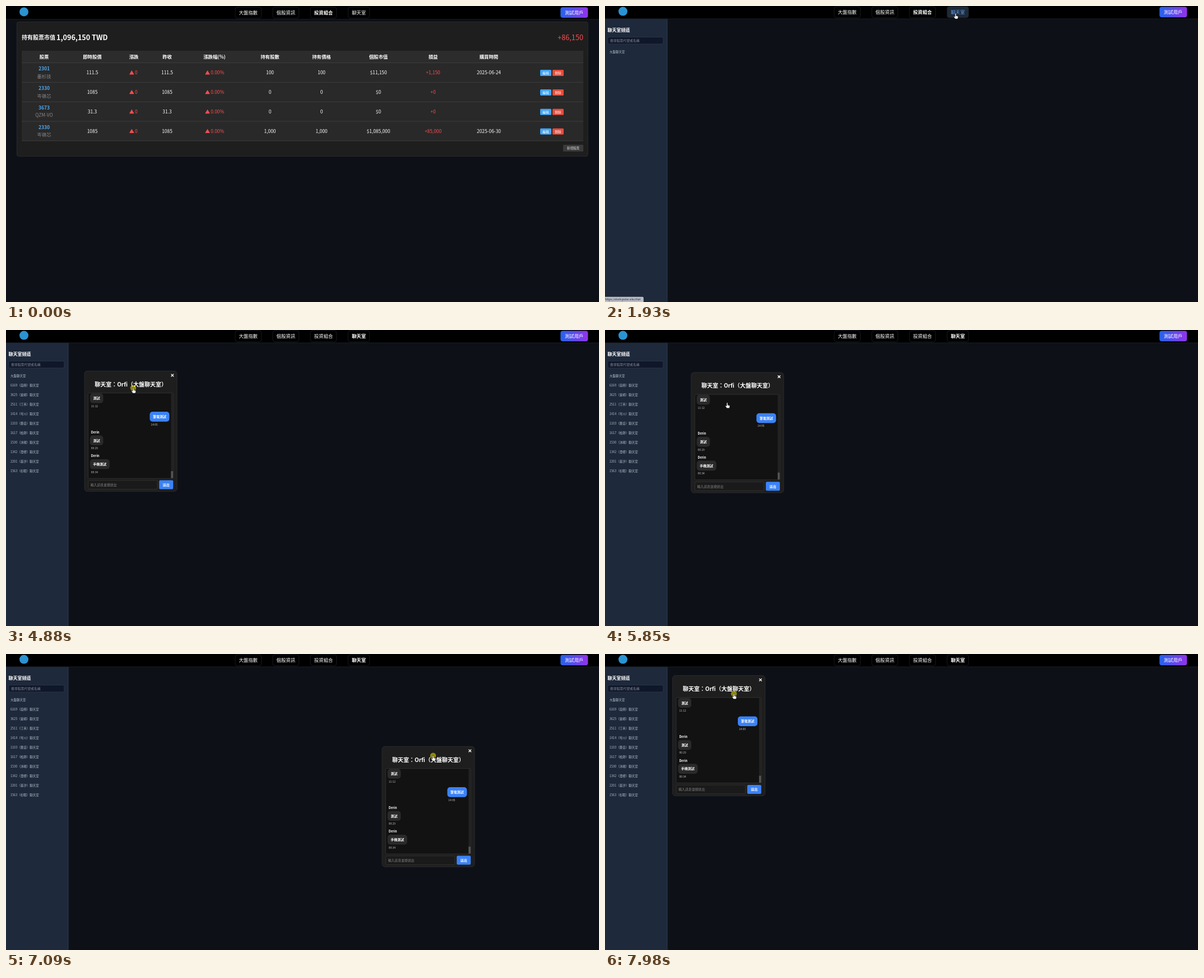
An HTML page for the animation above (8 s loop, 1058x529 px).

```html
<!DOCTYPE html>
<html lang="zh-Hant">
<head>
<meta charset="utf-8">
<title>投資組合與聊天室</title>
<style>
html, body { margin: 0; width: 100%; height: 100%; overflow: hidden; background: #0d1117; }
svg { display: block; width: 100%; height: 100%; }
text { font-family: "Noto Sans CJK TC", "Noto Sans CJK", "Noto Sans", sans-serif; white-space: pre; }
</style>
</head>
<body>
<svg id="stage" viewBox="0 0 1058 529" xmlns="http://www.w3.org/2000/svg">
  <defs>
    <linearGradient id="userFill"><stop offset="0" stop-color="#2563eb"/><stop offset="1" stop-color="#9333ea"/></linearGradient>
  </defs>
</svg>
<script>
const LOOP = 8000;
const NS = "http://www.w3.org/2000/svg";
const stage = document.getElementById("stage");

function el(parent, tag, attrs) {
  const node = document.createElementNS(NS, tag);
  for (const k in attrs) node.setAttribute(k, attrs[k]);
  return parent.appendChild(node);
}
const group = (parent) => el(parent, "g", {});

function box(parent, x, y, width, height, fill, rx = 0, stroke = "none") {
  return el(parent, "rect", { x, y, width, height, fill, rx, stroke, "stroke-width": 0.7 });
}

// y is the middle of the line
function label(parent, x, y, str, size, fill, weight = 400, anchor = "start") {
  const node = el(parent, "text", {
    x, y: y + size * 0.37, "font-size": size, fill, "font-weight": weight, "text-anchor": anchor
  });
  node.textContent = str;
  return node;
}
const mid = (parent, x, y, str, size, fill, weight) => label(parent, x, y, str, size, fill, weight, "middle");

/* ---------- pages ---------- */

const RED = "#ff4d4f", BLUE = "#4dabf7", LINE = "#424242", ACCENT = "#3b82f6", SOFT = "#b4becb";

function buildPortfolio() {
  const g = group(stage);
  box(g, 19.4, 28.4, 1018.8, 240.2, "#1e1e1e", 3, "#333");
  label(g, 28, 56.5, "持有股票市值", 10, "#fff", 700);
  label(g, 90, 56, "1,096,150 TWD", 12.6, "#fff", 700);
  label(g, 1030, 56, "+86,150", 12.7, RED, 400, "end");

  const cols = [68, 154, 228, 287.5, 372, 471, 563, 664.5, 762, 861.5];
  const heads = ["股票", "即時股價", "漲跌", "昨收", "漲跌幅(%)", "持有股數", "持有價格", "個股市值", "損益", "購買時間"];
  box(g, 28, 80, 1002, 161, "#292929");
  box(g, 28, 80, 1002, 21, "#2c2c2c");
  heads.forEach((h, i) => mid(g, cols[i], 90.5, h, 8.4, "#fff", 700));

  const rows = [
    ["2301", "墨杉技", "111.5", "100", "100", "$11,150", "+1,150", "2025-06-24"],
    ["2330", "岑嶺芯", "1085", "0", "0", "$0", "+0", ""],
    ["3673", "QZM-VO", "31.3", "0", "0", "$0", "+0", ""],
    ["2330", "岑嶺芯", "1085", "1,000", "1,000", "$1,085,000", "+85,000", "2025-06-30"]
  ];
  const rise = (x, y, str) => {
    el(g, "path", { d: `M${x} ${y + 3.4}h8.6l-4.3 -7.4z`, fill: RED });
    label(g, x + 10, y, str, 8.4, RED);
  };
  const button = (x, y, str, fill) => {
    box(g, x, y - 5, 20, 11, fill, 1.6);
    mid(g, x + 10, y + 0.7, str, 5.7, "#fff", 500);
  };
  rows.forEach(([code, name, price, count, cost, value, gain, date], i) => {
    const y = 119 + i * 34.9;
    box(g, 28, y - 18, 1002, 0.8, LINE);
    mid(g, cols[0], y - 6.8, code, 8.5, BLUE, 700);
    mid(g, cols[0], y + 6.6, name, 8.3, "#888");
    [price, "", price, "", count, cost, value, gain, date].forEach((s, k) => {
      mid(g, cols[k + 1], y, s, 8.4, s === gain ? RED : "#fff");
    });
    rise(220, y, "0");
    rise(355.2, y, "0.00%");
    button(953, y, "編輯", "#42a5f5");
    button(975, y, "刪除", "#e74c3c");
  });
  box(g, 28, 240.5, 1002, 0.8, LINE);
  box(g, 994, 248, 36, 12, "#3a3a3a", 1);
  mid(g, 1012, 254, "新增股票", 5.6, "#ddd");
  return g;
}

function buildChatPage() {
  const g = group(stage);
  box(g, 0, 22, 111, 507, "#1e293b");
  box(g, 110.6, 22, 0.8, 507, "#334155");
  label(g, 4.5, 42.7, "聊天室頻道", 8, "#fff", 700);
  box(g, 4.9, 55.6, 99, 12.3, "#0f172a", 2, "#334155");
  label(g, 9, 61.8, "搜尋股票代號或名稱", 5.85, "#858b96");
  const row = box(g, 5, 75, 99.5, 13.6, "#334155", 2);
  const rowY = (i) => 81.8 + i * 16.98;
  label(g, 8, rowY(0), "大盤聊天室", 5.5, SOFT);

  const list = group(g);
  const rooms = "6169嵐朔 3625棠嶼 2511汀禾 1414岑川 1103霽岳 1617柏渺 1530沐峴 1342澄樺 2201墨汐 1563杉眠";
  rooms.split(" ").forEach((r, i) => {
    label(list, 8, rowY(i + 1), `${r.slice(0, 4)}（${r.slice(4)}）聊天室`, 5.5, SOFT);
  });
  return { g, row, list };
}

function buildHeader() {
  const g = group(stage);
  box(g, 0, -2, 1058, 25.5, "#000");
  box(g, 0, 23.4, 1058, 0.7, "#1c222b");
  el(g, "circle", { cx: 32, cy: 10.4, r: 8, fill: "#2b93d1" });
  const item = (x, w, str) => ({
    box: box(g, x, 1.9, w, 20, "#000", 4, "#20262f"),
    text: mid(g, x + w / 2, 11.9, str, 8.4, "#fff")
  });
  item(408.9, 46.6, "大盤指數");
  item(476, 46.6, "個股資訊");
  const folio = item(543.1, 46.6, "投資組合");
  const chat = item(610.3, 38.4, "聊天室");
  box(g, 989.3, 2.2, 49, 18.8, "url(#userFill)", 4);
  mid(g, 1013.7, 11.8, "測試用戶", 8.4, "#fff");
  return { g, folio, chat };
}

function buildDialog() {
  const g = group(stage);
  box(g, 0.5, 0.5, 165, 215, "#1e1e1e", 5, "#343434");
  el(g, "path", { d: "M155 5.8l4.6 4.6m0-4.6l-4.6 4.6", stroke: "#fff", "stroke-width": 1.4 });
  mid(g, 83, 24, "聊天室：Orfi（大盤聊天室）", 10, "#fff", 700);
  box(g, 6.9, 39.8, 151.8, 152.6, "#121212", 2, "#3a3a3a");
  box(g, 154.8, 40.2, 3.6, 151.8, "#222");
  box(g, 154.8, 179.5, 3.6, 12.3, "#555");

  const bubble = (x, y, w, str, fill, time) => {
    box(g, x, y, w, 17.6, fill, 5);
    mid(g, x + w / 2, y + 8.9, str, 6, "#fff", 700);
    label(g, x + 2, y + 22.9, time, 4.9, "#c4c4c4");
  };
  const named = (y, w, str, time) => {
    label(g, 12.3, y, "Derin", 5.5, "#fff", 700);
    bubble(10.3, y + 5.7, w, str, "#2a2a2a", time);
  };
  bubble(10.3, 40.4, 23.6, "測試", "#2a2a2a", "11:12");
  bubble(116.9, 73.3, 35, "筆電測試", ACCENT, "14:05");
  named(110, 23.6, "測試", "00:29");
  named(152.5, 35, "手機測試", "00:34");

  box(g, 6.9, 196, 123.6, 15.8, "#1a1a1a", 2, "#3a3a3a");
  label(g, 11.2, 204, "輸入訊息並按送出", 5.85, "#858585");
  box(g, 133.7, 195.8, 25, 16, ACCENT, 2);
  mid(g, 146.2, 204, "送出", 6, "#fff", 700);
  return g;
}

function buildStatus() {
  const g = group(stage);
  box(g, -3, 519.8, 71.8, 14, "#b9bcc6", 2);
  label(g, 0.3, 524.6, "https://stock-pulse.site/chat", 4.8, "#1c1e24");
  return g;
}

function buildCursor() {
  const g = group(stage);
  const press = el(g, "circle", { r: 5.2, fill: "#ffee00", opacity: 0.52 });
  const ink = { fill: "#fff", stroke: "#000", "stroke-width": 0.6, "stroke-linejoin": "round" };
  const hand = el(g, "path", {
    ...ink, d: "M-1 .5q0 -1 1 -1t1 1v3.4l2.7 .6q1.1 .3 1 1.4l-.7 3.6h-4.7l-2.4 -3.5q-.5 -1.1 .5 -1.3l1.6 1z"
  });
  const arrow = el(g, "path", { ...ink, d: "M0 0v9l2 -1.9 1.4 3 1.4 -.6 -1.4 -3h3z" });
  return { g, press, hand, arrow };
}

const folioPage = buildPortfolio();
const chatPage = buildChatPage();
const header = buildHeader();
const dialog = buildDialog();
const status = buildStatus();
const cursor = buildCursor();

/* ---------- motion ---------- */

// key points: [time, x, y]
const pointerPath = [
  [260, 992, 482], [560, 840, 225], [1030, 626, 14], [2390, 625, 13.5], [3160, 25, 84], [3430, 25, 84],
  [3840, 157, 257.5], [4400, 186, 105], [5160, 236, 105.4], [5520, 242, 304], [5850, 218, 130.5], [6060, 236, 105.4]
];
const dialogPath = [
  [4400, 103.2, 74.8], [4750, 130, 72], [5160, 153.3, 75.4], [6060, 153.3, 75.4], [6400, 175, 76],
  [6610, 277.3, 78.5], [6670, 342, 83], [6840, 400, 262], [7090, 670.2, 165.1], [7150, 679, 152],
  [7330, 520, 54], [7610, 138, 180], [7780, 279, 200], [7900, 94, 20], [7980, 119.7, 38], [8040, 147, 41]
];
const GRIP = [83, 30];  // where the pointer holds the dialog
const LAG = 60;         // the dialog trails the pointer by this time
const STEP = 830 / 12;

// cubic through the key points that never overshoots them
function glide(path, t) {
  const last = path.length - 1;
  if (t <= path[0][0]) return path[0].slice(1);
  if (t >= path[last][0]) return path[last].slice(1);
  const i = path.findIndex((p) => p[0] > t) - 1;
  const span = path[i + 1][0] - path[i][0];
  const u = (t - path[i][0]) / span;
  return [1, 2].map((c) => {
    const slope = (k) => (path[k + 1][c] - path[k][c]) / (path[k + 1][0] - path[k][0]);
    const tangent = (k) => {
      if (k === 0 || k === last) return 0;
      const a = slope(k - 1), b = slope(k);
      return a * b > 0 ? 2 * a * b / (a + b) : 0;
    };
    const from = path[i][c], to = path[i + 1][c], v = 1 - u;
    return from * v * v * (1 + 2 * u) + to * u * u * (3 - 2 * u)
      + span * u * v * (tangent(i) * v - tangent(i + 1) * u);
  });
}
const ramp = (t, from, to) => Math.min(1, Math.max(0, (t - from) / (to - from)));
const within = (t, from, to) => t >= from && t < to;
const mix = (a, b, k) => `rgb(${a.map((v, i) => Math.round(v + (b[i] - v) * k))})`;
const show = (node, on) => node.setAttribute("display", on ? "inline" : "none");
const move = (node, [x, y]) => node.setAttribute("transform", `translate(${x.toFixed(2)} ${y.toFixed(2)})`);
const stepped = (t) => Math.min(t, 250 + Math.floor((t - 232) / STEP) * STEP);

function draw(time) {
  const t = stepped(time);
  const onChat = time >= 1860, swapped = time >= 1985;

  show(folioPage, !onChat);
  show(chatPage.g, onChat);
  show(chatPage.list, time >= 2250);
  show(chatPage.row, within(t, 3090, 3640));
  move(header.g, [0, onChat ? -0.8 : 0]);

  const hover = ramp(t, 940, 1130) - ramp(t, 2400, 2600);
  header.chat.box.setAttribute("fill", mix([0, 0, 0], [31, 41, 55], hover));
  header.chat.text.setAttribute("fill", mix([255, 255, 255], [96, 165, 250], hover));
  header.chat.text.setAttribute("font-weight", swapped ? 700 : 400);
  header.folio.text.setAttribute("font-weight", swapped ? 400 : 700);
  status.setAttribute("opacity", ramp(t, 1250, 1400) - ramp(t, 2430, 2600));

  show(dialog, time >= 3570);
  move(dialog, glide(dialogPath, t));

  const dragging = within(time, 4400, 5160) || time >= 6060;
  const held = glide(dialogPath, t + LAG).map((v, i) => v + GRIP[i]);
  move(cursor.g, dragging ? held : glide(pointerPath, t));
  show(cursor.g, time >= 260);
  show(cursor.press, dragging || within(time, 3230, 3430));
  const pointing = within(t, 940, 2400) || t >= 3090;
  show(cursor.hand, pointing);
  show(cursor.arrow, !pointing);
}

const begin = performance.now();
function tick() {
  draw((performance.now() - begin) % LOOP);
  requestAnimationFrame(tick);
}
tick();
</script>
</body>
</html>
```
